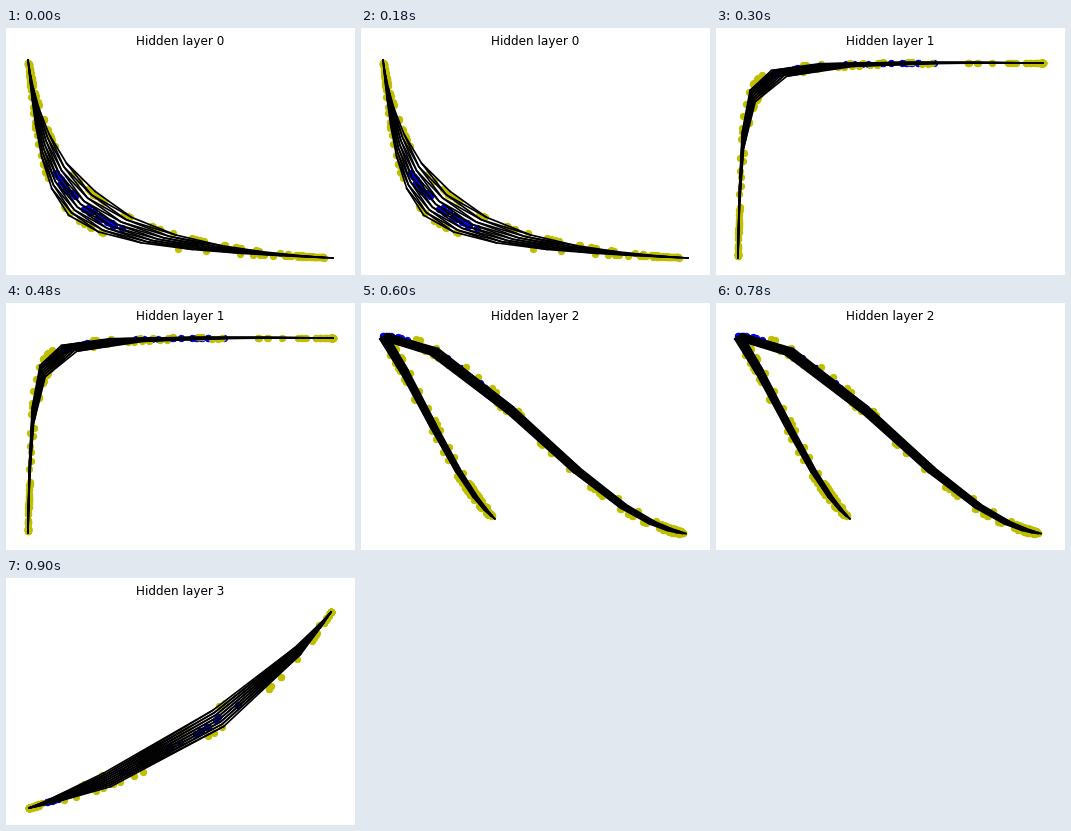
Animation of 349 by 247 pixels, one loop 1.2 s. Source, as a matplotlib script:

```python
import numpy as np
import matplotlib.pyplot as plt
from matplotlib.animation import ArtistAnimation

W, H, DPI = 349, 247, 72
EPS = 1e-6  # guards against the pixel size being rounded down
GRID = 9

plt.rcParams["font.family"] = "DejaVu Sans"
fig = plt.figure(figsize=((W + EPS) / DPI, (H + EPS) / DPI), dpi=DPI,
                 facecolor="white")
ax = fig.add_axes([0, 0, 1, 1])
ax.set_xlim(0, W)
ax.set_ylim(H, 0)
ax.axis("off")
rng = np.random.default_rng(4)


def sigmoid(z):
    return 1 / (1 + np.exp(-z))


def ramp(z, lo, hi):
    """Sigmoid rescaled to run from 0 at lo to 1 at hi."""
    return (sigmoid(z) - sigmoid(lo)) / (sigmoid(hi) - sigmoid(lo))


def bezier(u, *knots):
    a, b, c, d = (np.array(k, float) for k in knots)
    u = u[:, None]
    v = 1 - u
    return v**3 * a + 3 * v * v * u * b + 3 * v * u * u * c + u**3 * d


# Input plane: t runs along the main diagonal, s across it.
def ring(radius, count, noise):
    angle = rng.uniform(0, 2 * np.pi, count)
    r = radius * rng.normal(1, noise, count)
    return r * np.cos(angle), r * np.sin(angle)


def grid_lines():
    p = np.linspace(-1, 1, GRID)
    for q in p:
        for sign in (1, -1):
            yield (p + q) / 2, sign * (p - q) / 2


# Each layer squeezes the plane into a thin curved sheet.
def elbow(corner, end_x, end_y, gain, shift, gap, spread):
    corner, end_x, end_y = (np.array(k, float) for k in (corner, end_x, end_y))

    def place(t, s):
        z = gain * t + shift
        g = gap + spread * s
        x = ramp(z - g, shift - gain - gap, shift + gain - gap)
        y = ramp(-z - g, -shift - gain - gap, -shift + gain - gap)
        return (corner + x[:, None] * (end_x - corner)
                + y[:, None] * (end_y - corner))
    return place


def fork(t, s):
    d = t + 0.12
    u = np.tanh(2.5 * np.abs(d)) ** 1.4
    long_arm = bezier(u, (22, 33), (115, 33), (225, 218), (328, 231))
    short_arm = bezier(u, (22, 33), (58, 85), (98, 190), (138, 219))
    path = np.where(d[:, None] > 0, long_arm, short_arm)
    return path + s[:, None] * np.array([4, -3])


def blade(t, s):
    u = (1 + np.tanh(6 * t - 0.6)) / 2
    low = bezier(u, (23, 230), (140, 208), (262, 140), (325, 34))
    chord = np.array([23, 230]) + u[:, None] * np.array([302, -196])
    v = (0.25 + 0.3 * s)[:, None]
    return (1 - v) * low + v * chord


layers = [
    elbow((22, 230), (327, 230), (22, 32), 5, -0.3, 1.3, 0.3),
    elbow((22, 31), (327, 35), (22, 230), 9, 1.5, 2.25, 0.25),
    fork,
    blade,
]
blue = ring(0.12, 30, 0.2)
yellow = ring(0.85, 170, 0.02)


def draw(number, place):
    art = [ax.text(174, 17, f"Hidden layer {number}", fontsize=12,
                   ha="center", va="baseline", color="black")]
    for dots, color in ((blue, "b"), (yellow, "y")):
        art.append(ax.scatter(*place(*dots).T, s=40, c=color, zorder=1))
    for line in grid_lines():
        art += ax.plot(*place(*line).T, color="black", lw=1.7, zorder=2)
    return art


scenes = [draw(i, place) for i, place in enumerate(layers)]
anim = ArtistAnimation(fig, scenes, interval=300, repeat=True, repeat_delay=0)
plt.show()
```
